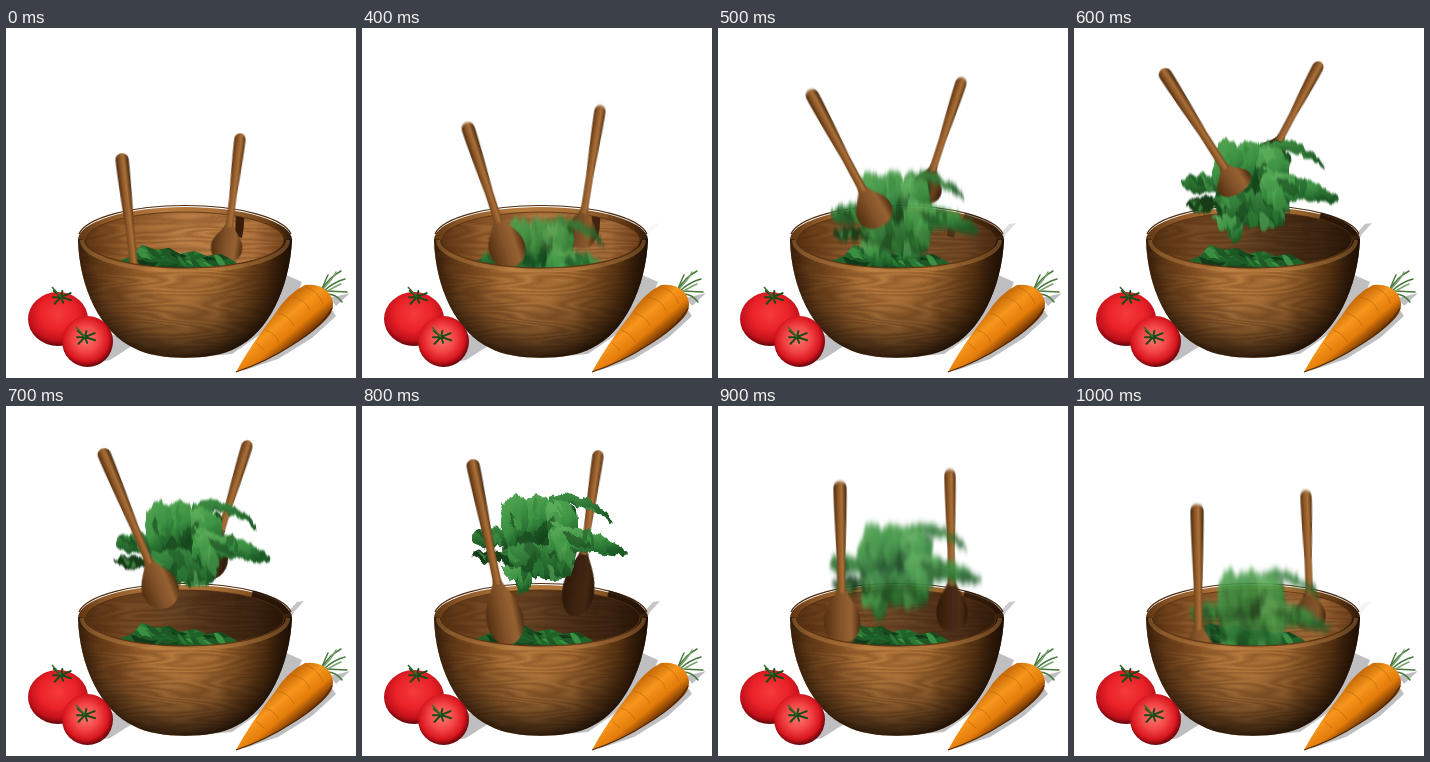
Recreate the animation shown at these times as an HTML page. Size 350x350 px, loop 1.1 s.

```html
<!DOCTYPE html>
<html lang="en">
<head>
<meta charset="utf-8">
<title>Tossed salad</title>
<style>
html, body { margin: 0; width: 100%; height: 100%; overflow: hidden; background: #fff; }
svg { display: block; width: 100vw; height: 100vh; }
</style>
</head>
<body>
<svg viewBox="0 0 350 350">
  <defs>
    <linearGradient id="wood" gradientUnits="userSpaceOnUse" x1="72" x2="286">
      <stop offset="0" stop-color="#5e3614"/><stop offset=".12" stop-color="#8b5626"/>
      <stop offset=".4" stop-color="#b87c3f"/><stop offset=".65" stop-color="#a97036"/>
      <stop offset=".87" stop-color="#734519"/><stop offset="1" stop-color="#301a08"/>
    </linearGradient>
    <radialGradient id="under" gradientUnits="userSpaceOnUse" cx="0" cy="0" r="1" gradientTransform="translate(172 222) scale(122 111)">
      <stop offset=".4" stop-color="#140a03" stop-opacity="0"/>
      <stop offset=".7" stop-color="#140a03" stop-opacity=".28"/>
      <stop offset=".88" stop-color="#140a03" stop-opacity=".62"/>
      <stop offset="1" stop-color="#140a03" stop-opacity=".9"/>
    </radialGradient>
    <linearGradient id="inside">
      <stop offset="0" stop-color="#5d3614"/><stop offset=".2" stop-color="#9a6230"/>
      <stop offset=".5" stop-color="#c08449"/><stop offset=".85" stop-color="#b57740"/>
      <stop offset="1" stop-color="#7b4a20"/>
    </linearGradient>
    <linearGradient id="dark">
      <stop offset="0" stop-color="#1a0d04" stop-opacity=".15"/>
      <stop offset=".3" stop-color="#1a0d04" stop-opacity=".4"/>
      <stop offset=".6" stop-color="#1a0d04" stop-opacity=".72"/>
      <stop offset="1" stop-color="#1a0d04" stop-opacity=".95"/>
    </linearGradient>
    <linearGradient id="rod" gradientUnits="userSpaceOnUse" x1="-7" x2="7">
      <stop offset="0" stop-color="#472609"/><stop offset=".35" stop-color="#8c5628"/>
      <stop offset=".6" stop-color="#ab7038"/><stop offset="1" stop-color="#371d08"/>
    </linearGradient>
    <linearGradient id="scoop">
      <stop offset="0" stop-color="#53300f"/><stop offset=".45" stop-color="#83522a"/>
      <stop offset=".75" stop-color="#966231"/><stop offset="1" stop-color="#4c2b10"/>
    </linearGradient>
    <radialGradient id="red" cx=".5" cy=".4" r=".62">
      <stop offset="0" stop-color="#f53b3c"/><stop offset=".5" stop-color="#ea2228"/>
      <stop offset=".8" stop-color="#c1101a"/><stop offset="1" stop-color="#4c0306"/>
    </radialGradient>
    <radialGradient id="pink" cx=".47" cy=".45" r=".56">
      <stop offset="0" stop-color="#fb7a74"/><stop offset=".45" stop-color="#f34645"/>
      <stop offset=".78" stop-color="#d9161f"/><stop offset="1" stop-color="#5c0408"/>
    </radialGradient>
    <linearGradient id="orange" gradientUnits="userSpaceOnUse" x1="264" y1="285" x2="290" y2="316">
      <stop offset="0" stop-color="#c76a07"/><stop offset=".35" stop-color="#f7961c"/>
      <stop offset=".7" stop-color="#e47c0a"/><stop offset="1" stop-color="#703502"/>
    </linearGradient>
    <linearGradient id="light" x2=".5" y2="1">
      <stop offset="0" stop-color="#5bab58"/><stop offset=".6" stop-color="#3b9142"/><stop offset="1" stop-color="#1d5a26"/>
    </linearGradient>
    <linearGradient id="mid" x2=".3" y2="1">
      <stop offset="0" stop-color="#3f9245"/><stop offset="1" stop-color="#1c5524"/>
    </linearGradient>
    <filter id="grain" x="0" y="0" width="1" height="1" color-interpolation-filters="sRGB">
      <feTurbulence type="fractalNoise" baseFrequency=".007 .055" numOctaves="2" seed="8"/>
      <feColorMatrix values="0 0 0 0 .3 0 0 0 0 .13 0 0 0 0 .02 1 0 0 0 0"/>
      <feComponentTransfer><feFuncA type="table" tableValues="0 .3 0 .3 0 .3 0 .3 0 .3 0 .3 0 .3 0 .3 0"/></feComponentTransfer>
    </filter>
    <filter id="soft" x="-.2" y="-.2" width="1.4" height="1.4"><feGaussianBlur stdDeviation=".5"/></filter>
    <filter id="rush" filterUnits="userSpaceOnUse" x="0" y="0" width="350" height="350">
      <feTurbulence type="fractalNoise" baseFrequency=".16 .05" numOctaves="2" seed="3" result="noise"/>
      <feDisplacementMap in="SourceGraphic" in2="noise" scale="10" xChannelSelector="R" yChannelSelector="G"/>
      <feGaussianBlur id="rushBlur" stdDeviation="0"/>
    </filter>
    <filter id="swing" filterUnits="userSpaceOnUse" x="-60" y="-30" width="120" height="270"><feGaussianBlur id="swingBlur" stdDeviation="0"/></filter>
    <path id="front" d="M72 211C73 260 95 305 128 320C150 333 208 333 230 320C262 305 284 260 286 211L278 212A99 28 0 0 1 80 212Z"/>
    <path id="heapShape" d="M113 233L126 228L136 217L150 222L163 220L174 226L188 223L201 228L215 226L230 234L235 243L115 243Z"/>
    <clipPath id="frontClip"><use href="#front"/></clipPath>
    <clipPath id="insideClip"><ellipse cx="179" cy="212" rx="99" ry="28"/></clipPath>
    <clipPath id="heapClip"><use href="#heapShape"/></clipPath>
    <clipPath id="tossClip"></clipPath>
  </defs>

  <g fill="#bfbfc2" filter="url(#soft)">
    <path d="M278 246L296 254Q286 282 252 308L226 326L205 328Z"/>
    <path d="M100 304L113 309L126 318L104 332L84 336Z"/>
    <path d="M326 282L330 288L306 310L272 331L236 343L290 305Z"/>
    <path d="M324 270L344 265L330 278Z"/>
    <path id="cast" d="M282 206L291 196L298 195L288 206L284 214Z"/>
  </g>

  <ellipse cx="179" cy="212" rx="107" ry="33" fill="url(#wood)"/>
  <path d="M73 206A107 33 0 0 1 285 206" fill="none" stroke="#4d2a0e" stroke-width="1.2"/>
  <path id="rimShade" d="M246 188A103 31 0 0 1 280 208" fill="none" stroke="#241205" stroke-width="7"/>
  <ellipse cx="179" cy="212" rx="99" ry="28" fill="url(#inside)"/>
  <g clip-path="url(#insideClip)">
    <rect x="72" y="178" width="214" height="66" filter="url(#grain)"/>
    <path id="streak" d="M230 182L238 183Q239 196 236 210L229 208Z" fill="#3a1e0b"/>
    <rect id="shade" x="80" y="182" width="200" height="60" fill="url(#dark)"/>
  </g>
  <path d="M80 212A99 28 0 0 1 278 212" fill="none" stroke="#4d290d" stroke-width="1" opacity=".7"/>

  <g id="right"></g>
  <g><use href="#heapShape" fill="#1f6329"/><g id="heap" clip-path="url(#heapClip)"></g></g>
  <g filter="url(#rush)"><g id="toss"><g id="leaves"></g><g id="folds" clip-path="url(#tossClip)" opacity=".55"></g></g></g>
  <g id="left"></g>

  <use href="#front" fill="url(#wood)"/>
  <g clip-path="url(#frontClip)">
    <rect x="70" y="205" width="218" height="126" filter="url(#grain)"/>
    <rect x="70" y="205" width="218" height="126" fill="url(#under)"/>
  </g>
  <path d="M76 212A103 31 0 0 0 282 212" fill="none" stroke="#c68a4a" stroke-width="4" opacity=".4"/>
  <path d="M80 212A99 28 0 0 0 278 212" fill="none" stroke="#5b3212" stroke-width="1"/>

  <g id="tomatoes"></g>

  <g fill="none" stroke="#47783c" stroke-width="1.5" stroke-linecap="round">
    <path d="M317 261Q322 250 335 243M316 261Q320 251 322 247M319 262Q328 254 339 251M320 263L341 264M321 266Q330 266 336 274"/>
    <path d="M318 260Q326 252 330 244M320 264Q330 258 335 256" stroke="#7ba36e"/>
  </g>
  <path d="M230 344Q244 318 268 287Q282 265 299 257Q314 255 323 265Q330 275 325 285Q316 299 286 317Q260 334 230 344Z" fill="url(#orange)"/>
  <path d="M326 280Q316 299 286 317Q260 334 230 344" fill="none" stroke="#4f2502" stroke-width="1.2"/>
  <path d="M285 269Q300 271 304 283M272 285Q284 288 288 298M300 259Q313 264 317 276M259 302Q269 305 273 314M250 315L258 322" fill="none" stroke="#b96205" stroke-width="1" opacity=".6"/>
</svg>
<script>
const $ = id => document.getElementById(id);

// Each pose: spoons as [tipX, tipY, headX, headY, head half length],
// toss as [dy, scaleX, scaleY, opacity], blur amount, shade in the bowl.
const poses = [
  { left: [116, 131, 131, 264, 24], right: [234, 111, 221, 217, 18], toss: [100, .9, 1, 0], blur: 0, shade: 0 },
  { left: [106, 100, 144, 217, 24], right: [238, 83, 219, 203, 18], toss: [101, .87, 1, .92], blur: 2.4, shade: .1 },
  { left: [94, 67, 155, 181, 20], right: [243, 55, 209, 159, 17], toss: [55, .94, 1, .95], blur: 2.4, shade: .5 },
  { left: [91, 46, 159, 153, 14], right: [244, 39, 198, 126, 15], toss: [23, 1, 1.04, 1], blur: 1.2, shade: .9 },
  { left: [98, 48, 153, 180, 24], right: [241, 40, 207, 151, 23], toss: [6, 1, 1, 1], blur: 1, shade: .9 },
  { left: [111, 59, 142, 209, 31], right: [236, 50, 217, 180, 32], toss: [0, 1, 1, 1], blur: .6, shade: .9 },
  { left: [122, 81, 124, 213, 26], right: [232, 69, 234, 203, 24], toss: [29, .97, .98, .92], blur: 3, shade: .8 },
  { left: [123, 104, 125, 248, 24], right: [232, 90, 236, 207, 18], toss: [75, .9, 1, .88], blur: 3, shade: .15 }
];

// Salad leaves, back to front.
const leaves = [
  ["#1b5023", "M142 105C152 94 205 94 214 102L216 140L210 170L188 175L166 170L146 172L141 150Z"],
  ["url(#mid)", "M186 92C205 86 222 88 230 97C242 101 249 108 252 119C243 110 234 105 222 103C212 97 200 97 186 98Z"],
  ["#133b18", "M110 150C116 142 132 143 148 147C140 157 128 160 118 156Z"],
  ["url(#mid)", "M146 142C160 132 185 140 212 144C214 160 208 170 200 174C186 178 170 166 150 160Z"],
  ["url(#light)", "M138 160C150 160 164 162 170 170C172 180 166 186 160 188C154 178 142 172 138 160Z"],
  ["url(#mid)", "M109 130C116 121 128 120 140 123L148 136C138 142 126 142 120 140C112 140 110 135 109 130Z"],
  ["url(#light)", "M160 96C168 88 182 86 186 96C190 112 184 130 174 134C164 130 158 112 160 96Z"],
  ["url(#light)", "M139 122C138 105 143 92 152 87C158 92 170 95 168 110C166 126 156 138 146 142Z"],
  ["url(#light)", "M184 98C196 92 212 96 214 110C216 128 206 142 194 144C184 136 182 112 184 98Z"],
  ["url(#light)", "M186 124C210 118 232 124 246 133C255 139 264 143 266 147C262 153 244 150 230 145C216 148 204 148 186 142Z"]
];

let seed = 17;
const rnd = (a, b) => (seed = seed * 16807 % 2147483647, a + (b - a) * seed / 2147483647);

function foliage([x0, y0, x1, y1], count, size, turn, colors) {
  let out = "";
  for (let i = 0; i < count; i++) {
    const l = rnd(.6, 1.3) * size, w = l * rnd(.28, .5);
    const at = `translate(${rnd(x0, x1)} ${rnd(y0, y1)}) rotate(${turn + rnd(-45, 45)})`;
    const c = colors[Math.floor(rnd(0, colors.length))];
    out += `<path transform="${at}" fill="${c}" d="M${-l} 0Q${-l / 2} ${-w} 0 ${-w * .7}T${l} 0Q${l / 3} ${w} ${-l / 3} ${w * .6}Z"/>`;
  }
  return out;
}

function tomato(fill, x, y, rx, ry, sx, sy) {
  let star = "";
  for (let i = 0; i < 7; i++) {
    const a = i * Math.PI * 2 / 7 + .4, r = i % 2 ? 8 : 11;
    star += `M${sx} ${sy}L${sx + r * Math.cos(a)} ${sy + r * .75 * Math.sin(a)}`;
  }
  return `<ellipse cx="${x}" cy="${y}" rx="${rx}" ry="${ry}" fill="url(#${fill})"/>
    <path d="${star}" stroke="#1e4a18" stroke-width="2" stroke-linecap="round"/>
    <path d="M${sx} ${sy}l-9 -10" stroke="#3c6a2c" stroke-width="1.6"/>`;
}

function spoon(id, [x, y, hx, hy, l], k, shade) {
  const d = Math.hypot(hx - x, hy - y);
  const turn = Math.atan2(x - hx, hy - y) * 180 / Math.PI;
  const t = 6.3 * k, n = 4 * k, w = 17.5 * k, neck = d - l;
  const head = `M${-n} ${neck - 6}C${-n} ${neck + 4} ${-w} ${d - l * .5} ${-w} ${d + l * .15}C${-w} ${d + l * 1.25} ${w} ${d + l * 1.25} ${w} ${d + l * .15}C${w} ${d - l * .5} ${n} ${neck + 4} ${n} ${neck - 6}Z`;
  $(id).setAttribute("transform", `translate(${x} ${y}) rotate(${turn})`);
  $(id).innerHTML = `<g filter="url(#swing)">
    <path d="${head}" fill="url(#scoop)"/>
    <path d="${head}" fill="#1c0d04" opacity="${shade}"/>
    <path d="M${-t} 1C${-t} -8 ${t} -8 ${t} 1Q${t} 20 ${n} ${d * .55}L${n} ${neck}H${-n}L${-n} ${d * .55}Q${-t} 20 ${-t} 1Z" fill="url(#rod)"/></g>`;
}

const shapes = leaves.map(([fill, d]) => `<path fill="${fill}" d="${d}"/>`).join("");
$("leaves").innerHTML = $("tossClip").innerHTML = shapes;
$("folds").innerHTML = foliage([112, 92, 255, 182], 55, 13, 70, ["#143f1a", "#1d5525", "#2f8238", "#4a9f4d", "#62b45f"]);
$("heap").innerHTML = foliage([116, 219, 230, 243], 34, 12, 10, ["#123a18", "#1d5825", "#2a7833", "#3a8f42", "#17481e"]);
$("tomatoes").innerHTML = tomato("red", 52, 291, 30, 27, 55, 269) + tomato("pink", 81.5, 313.5, 25.5, 25.5, 79, 309);

function draw(p) {
  const [dy, sx, sy, alpha] = p.toss;
  spoon("left", p.left, 1.05, 0);
  spoon("right", p.right, .9, p.shade * .75);
  $("toss").setAttribute("transform", `translate(${182 * (1 - sx)} ${87 * (1 - sy) + dy}) scale(${sx} ${sy})`);
  $("toss").setAttribute("opacity", alpha);
  $("rushBlur").setAttribute("stdDeviation", `${.3 + p.blur * .2} ${p.blur}`);
  $("swingBlur").setAttribute("stdDeviation", `${p.blur * .15} ${p.blur * .5}`);
  for (const id of ["shade", "cast", "rimShade"]) $(id).setAttribute("opacity", p.shade);
  $("streak").setAttribute("opacity", 1 - p.shade);
}

let shown = -1;
const start = performance.now();
function tick() {
  const t = (performance.now() - start) % 1100;
  const i = t < 400 ? 0 : Math.floor(t / 100) - 3;
  if (i !== shown) draw(poses[shown = i]);
  requestAnimationFrame(tick);
}
tick();
</script>
</body>
</html>
```
